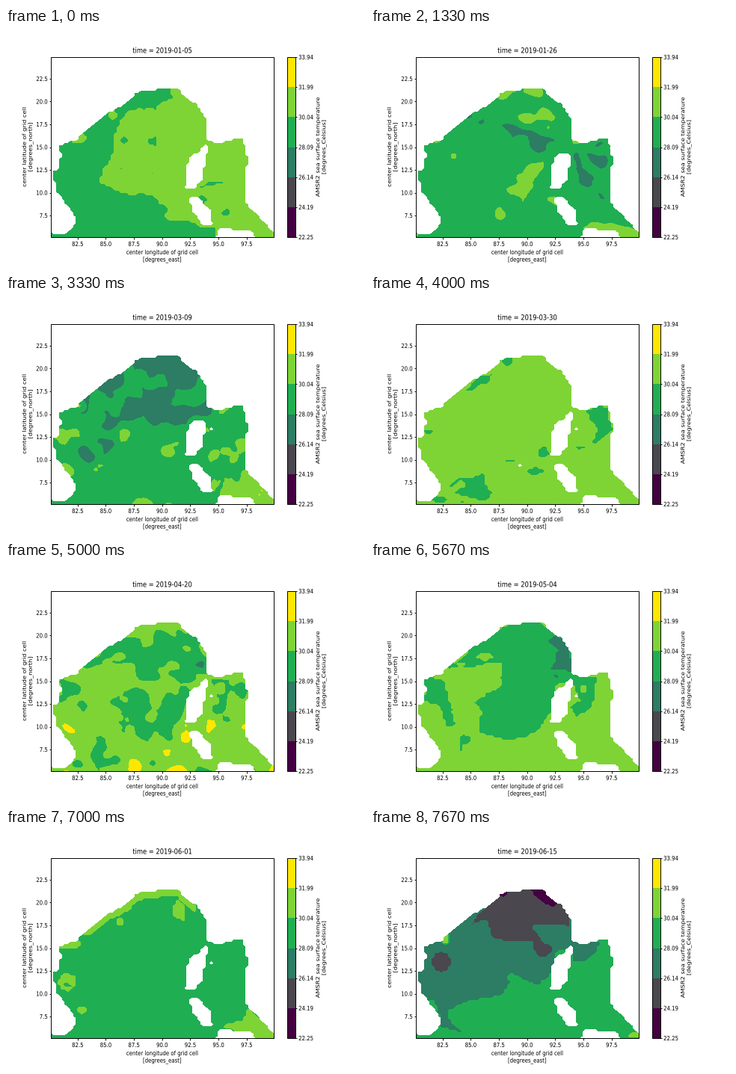
These frames come from a looping animation (480x320 px, 8 s). A matplotlib script:

```python
import numpy as np
import matplotlib.pyplot as plt
from matplotlib.animation import FuncAnimation
from matplotlib.patches import PathPatch, Rectangle
from matplotlib.path import Path
from matplotlib.textpath import TextPath
from matplotlib.transforms import Affine2D

WEEKS = 24
LOOP_MS = 8000
PIXEL_ASPECT = 1.19  # the whole chart has pixels taller than wide
LEFT, RIGHT, TOP, BOTTOM = 60, 357.5, 39, 280
MID_X, MID_Y = 208.8, 159.5
COLORS = ["#440042", "#4a474f", "#2c7d63", "#20ae53", "#7ed435", "#ffe700"]
CELLS = 80
SMALL, LARGE = 6.94, 8.33

fig = plt.figure(figsize=(4.8, 3.2), dpi=100, facecolor="white")
ax = fig.add_axes([0, 0, 1, 1])
ax.set_xlim(0, 480)
ax.set_ylim(320, 0)
ax.axis("off")

xs = np.linspace(LEFT, RIGHT, CELLS)
ys = np.linspace(TOP, BOTTOM, CELLS)
X, Y = np.meshgrid(xs, ys)


# --- geometry -------------------------------------------------------------
def blur(values, radius=1):
    size = 2 * radius + 1
    padded = np.pad(values, radius, mode="edge")
    return sum(padded[i:i + CELLS, j:j + CELLS]
               for i in range(size) for j in range(size)) / size ** 2


def noise(seed):
    n = np.random.default_rng(seed).normal(size=X.shape)
    n = blur(blur(n, 2))
    return n / n.std()


def inside(points, dx=0, dy=0):
    grid = np.column_stack([(X + dx).ravel(), (Y + dy).ravel()])
    return Path(points).contains_points(grid).reshape(X.shape)


RAGGED = 1.8 * noise(100), 1.5 * noise(101)


class Field:
    """Temperature band per cell; later shapes cover earlier ones."""

    def __init__(self, base):
        self.values = np.full(X.shape, base + 0.5)

    def area(self, band, *points):
        self.values[inside(points, *RAGGED)] = band + 0.5

    def spot(self, band, x, y, rx, ry):
        self.values[np.hypot((X - x) / rx, (Y - y) / ry) < 1] = band + 0.5

    def speckle(self, band, x, y, rx, ry, seed, level=1.0):
        near = np.hypot((X - x) / rx, (Y - y) / ry) < 1
        self.values[near & (noise(seed) > level)] = band + 0.5

    def north_coast(self, band, depth):
        """Band hugging the northern shore."""
        shore = ~inside(COAST, 0, -depth) & (Y < 158) & (X < 255)
        self.values[shore & (noise(7) > -0.9)] = band + 0.5


# --- coastline ------------------------------------------------------------
COAST = [
    (58, 275), (82, 277), (97, 258), (77, 228), (67, 217), (64, 192),
    (71, 189), (74, 167), (71, 160), (77, 156), (95, 151), (104, 141),
    (137, 114), (152, 107), (165, 100), (175, 87), (212, 82), (228, 81),
    (238, 92), (256, 105), (267, 123), (267, 149), (281, 157), (309, 149),
    (316, 150), (324, 179), (320, 187), (320, 236), (344, 261), (358, 276),
    (358, 283), (58, 283)]
ANDAMAN = [(247, 169), (264, 167), (269, 175), (262, 197), (262, 206),
           (250, 218), (238, 215), (242, 199), (240, 186)]
NORTH_SPIT = [(253, 168), (267, 154), (271, 160), (268, 172)]
NICOBAR = [(245, 226), (257, 225), (273, 242), (277, 264), (262, 264),
           (248, 245)]
SUMATRA = [(278, 284), (285, 265), (306, 270), (331, 272), (335, 284)]


def sea(*islands):
    wet = np.zeros(X.shape, bool)
    for dx in (-1.6, 1.6):
        for dy in (-1.3, 1.3):
            part = inside(COAST, dx, dy)
            for island in islands:
                part &= ~inside(island, dx, dy)
            wet |= part
    return wet


ISLANDS = ANDAMAN, NICOBAR, SUMATRA
SEA_OPEN = sea(*ISLANDS)
SEA_SPIT = sea(*ISLANDS, NORTH_SPIT)


# --- temperature bands at the anchor weeks ----------------------------------
def early_january():
    f = Field(4)
    f.area(3, (50, 290), (50, 70), (222, 70), (221, 92), (200, 111),
           (164, 111), (146, 138), (146, 166), (137, 180), (123, 206),
           (155, 220), (190, 222), (216, 240), (212, 254), (278, 268),
           (276, 290))
    f.speckle(3, 168, 165, 35, 50, seed=3)
    f.speckle(3, 282, 240, 36, 35, seed=5, level=0.6)
    f.spot(4, 143, 117, 7, 5)
    f.spot(4, 96, 147, 11, 7)
    return f.values


def early_february():
    f = Field(3)
    f.area(4, (172, 92), (200, 92), (228, 86), (228, 76), (172, 76))
    f.spot(4, 89, 151, 7, 4)
    f.area(2, (167, 126), (210, 136), (258, 149), (258, 163), (225, 168),
           (180, 153), (185, 141))
    f.area(2, (268, 161), (298, 155), (306, 148), (318, 150), (317, 231),
           (303, 236), (298, 215), (271, 206), (272, 190))
    f.speckle(3, 284, 178, 18, 20, seed=9)
    f.spot(2, 152, 125, 3, 2)
    f.spot(2, 163, 219, 3, 2)
    f.area(4, (286, 268), (326, 262), (362, 273), (362, 285), (286, 285))
    return f.values


def early_march():
    f = Field(3)
    f.area(2, (68, 172), (75, 156), (150, 96), (180, 75), (272, 75),
           (278, 160), (250, 168), (238, 189), (222, 195), (181, 184),
           (200, 178), (169, 166), (150, 180), (149, 201), (122, 228),
           (108, 231), (93, 206), (103, 188), (99, 178))
    f.area(1, (163, 104), (175, 78), (232, 78), (258, 106), (253, 122),
           (238, 129), (219, 120), (219, 104), (198, 94), (175, 104))
    f.spot(4, 98, 148, 6, 6)
    f.spot(4, 317, 200, 5, 7)
    f.area(4, (284, 263), (298, 244), (310, 250), (318, 237), (362, 272),
           (362, 285), (300, 285))
    f.speckle(4, 290, 225, 12, 25, seed=12, level=1.5)
    return f.values


def late_march():
    f = Field(4)
    f.area(3, (123, 127), (143, 106), (163, 103), (158, 118), (133, 126))
    f.spot(3, 182, 89, 9, 6)
    f.area(3, (284, 157), (305, 148), (318, 150), (325, 179), (293, 202),
           (301, 178))
    f.spot(3, 279, 204, 7, 3)
    f.spot(3, 76, 183, 7, 3)
    f.spot(3, 92, 274, 10, 6)
    f.area(3, (116, 246), (150, 240), (163, 267), (155, 276), (110, 262),
           (132, 254))
    f.speckle(3, 150, 262, 50, 20, seed=16, level=1.2)
    f.spot(3, 230, 211, 8, 8)
    f.spot(3, 219, 236, 12, 5)
    f.spot(3, 187, 222, 7, 3)
    return f.values


def early_may():
    f = Field(4)
    f.area(3, (102, 144), (143, 103), (212, 70), (272, 110), (272, 152),
           (248, 168), (238, 205), (212, 234), (185, 240), (142, 228),
           (147, 204), (136, 187), (172, 164), (178, 138), (150, 136))
    f.spot(4, 152, 127, 10, 4)
    f.spot(4, 121, 137, 6, 3)
    f.area(3, (68, 186), (70, 153), (98, 158), (112, 220), (101, 223),
           (90, 193))
    f.spot(3, 125, 238, 8, 7)
    f.spot(3, 121, 249, 3, 5)
    f.area(2, (233, 104), (250, 98), (270, 120), (266, 145), (240, 143),
           (250, 120))
    f.spot(2, 248, 153, 4, 3)
    f.area(3, (267, 152), (303, 154), (295, 192), (275, 209), (269, 196),
           (280, 186))
    f.spot(4, 284, 170, 4, 5)
    return f.values


def early_june():
    f = Field(3)
    f.north_coast(4, 8)
    f.spot(4, 152, 124, 5, 4)
    f.speckle(4, 231, 112, 8, 16, seed=21, level=1.3)
    f.spot(4, 82, 205, 11, 11)
    f.spot(3, 82, 209, 6, 3)
    f.spot(4, 102, 243, 6, 4)
    f.area(4, (288, 264), (316, 258), (320, 240), (362, 272), (362, 285),
           (332, 285))
    return f.values


def mid_june():
    f = Field(3)
    f.area(2, (55, 225), (68, 156), (180, 70), (240, 70), (272, 120),
           (270, 160), (250, 166), (240, 193), (222, 207), (188, 195),
           (179, 222), (130, 232), (102, 250), (123, 270), (95, 266),
           (85, 228))
    f.area(2, (264, 148), (306, 150), (303, 165), (284, 177), (270, 176))
    f.area(1, (132, 127), (150, 105), (180, 76), (235, 78), (267, 118),
           (266, 131), (222, 129), (214, 135), (243, 157), (243, 168),
           (228, 171), (213, 153), (180, 150), (162, 144), (155, 122))
    f.spot(1, 94, 178, 13, 14)
    f.area(0, (207, 76), (228, 76), (250, 100), (246, 108), (222, 92))
    f.spot(0, 178, 87, 6, 4)
    f.spot(4, 98, 147, 6, 6)
    f.spot(4, 353, 276, 7, 4)
    return f.values


ANCHORS = {0: early_january(), 4: early_february(), 8: early_march(),
           12: late_march(), 17: early_may(), 21: early_june(),
           23: mid_june()}

# Single missing cells, seen as white diamonds
GAPS = {4: [(207, 163), (237, 167), (222, 188), (267, 159), (286, 212),
            (301, 210)],
        8: [(265, 160)],
        12: [(199, 228)]}
ISLET = (275, 179)


def bands(week):
    if week in ANCHORS:
        return ANCHORS[week]
    before = max(w for w in ANCHORS if w < week)
    after = min(w for w in ANCHORS if w > week)
    t = (week - before) / (after - before)
    mix = (1 - t) * blur(ANCHORS[before]) + t * blur(ANCHORS[after])
    mix = mix + 0.3 * np.sin(np.pi * t) * noise(week)
    return np.clip(mix, 0.01, 5.99)


def sea_mask(week):
    wet = (SEA_OPEN if 3 <= week <= 9 else SEA_SPIT).copy()
    gaps = GAPS.get(week, []) + ([ISLET] if 4 <= week <= 22 else [])
    for x, y in gaps:
        wet[np.abs(ys - y).argmin(), np.abs(xs - x).argmin()] = False
    return wet


# --- chart furniture --------------------------------------------------------
def write(text, x, y, size=SMALL, align=0.5, angle=0):
    path = TextPath((0, 0), text, size=size)
    box = path.get_extents()
    place = (Affine2D().translate(-box.x0 - align * box.width, 0)
             .rotate_deg(angle).scale(1, -PIXEL_ASPECT).translate(x, y))
    return ax.add_patch(PathPatch(place.transform_path(path), fc="black",
                                  lw=0, zorder=5))


def line(x0, y0, x1, y1):
    ax.plot([x0, x1], [y0, y1], color="black", lw=0.65, zorder=4,
            solid_capstyle="butt")


def frame(x0, x1):
    ax.add_patch(Rectangle((x0, TOP), x1 - x0, BOTTOM - TOP, fill=False,
                           ec="black", lw=0.7, zorder=4))


def draw_axes():
    frame(LEFT, RIGHT)
    for lon in np.arange(82.5, 98, 2.5):
        x = LEFT + (lon - 80.125) / 19.75 * (RIGHT - LEFT)
        line(x, BOTTOM, x, BOTTOM + 3)
        write(f"{lon:.1f}", x, 292)
    for lat in np.arange(7.5, 23, 2.5):
        y = BOTTOM - (lat - 5.125) / 19.75 * (BOTTOM - TOP)
        line(LEFT - 2.5, y, LEFT, y)
        write(f"{lat:.1f}", 55.2, y + 3, align=1)
    write("center longitude of grid cell", MID_X, 303)
    write("[degrees_east]", MID_X, 312.6)
    write("center latitude of grid cell", 26.8, MID_Y, angle=90)
    write("[degrees_north]", 34.8, MID_Y, angle=90)


def draw_colorbar():
    x0, x1 = 376, 386.5
    edges = np.linspace(BOTTOM, TOP, len(COLORS) + 1)
    for color, low, high in zip(COLORS, edges, edges[1:]):
        ax.add_patch(Rectangle((x0, high), x1 - x0, low - high, fc=color,
                               lw=0))
    for y, value in zip(edges, np.linspace(22.246, 33.938, len(edges))):
        line(x1, y, x1 + 2.5, y)
        write(f"{value:.2f}", 391.6, y + 3, align=0)
    frame(x0, x1)
    write("AMSR2 sea surface temperature", 419.2, MID_Y, angle=90)
    write("[degrees_Celsius]", 427.2, MID_Y, angle=90)


draw_axes()
draw_colorbar()
shown = []


def update(week):
    while shown:
        shown.pop().remove()
    data = np.ma.masked_array(bands(week), ~sea_mask(week))
    shown.append(ax.contourf(X, Y, data, levels=range(7), colors=COLORS,
                             corner_mask=True, zorder=1))
    date = np.datetime64("2019-01-05") + 7 * week
    shown.append(write(f"time = {date}", MID_X, 33.4, LARGE))
    return shown


anim = FuncAnimation(fig, update, frames=WEEKS, init_func=lambda: [],
                     interval=LOOP_MS / WEEKS, repeat=True, repeat_delay=0,
                     blit=False)
plt.show()
```
